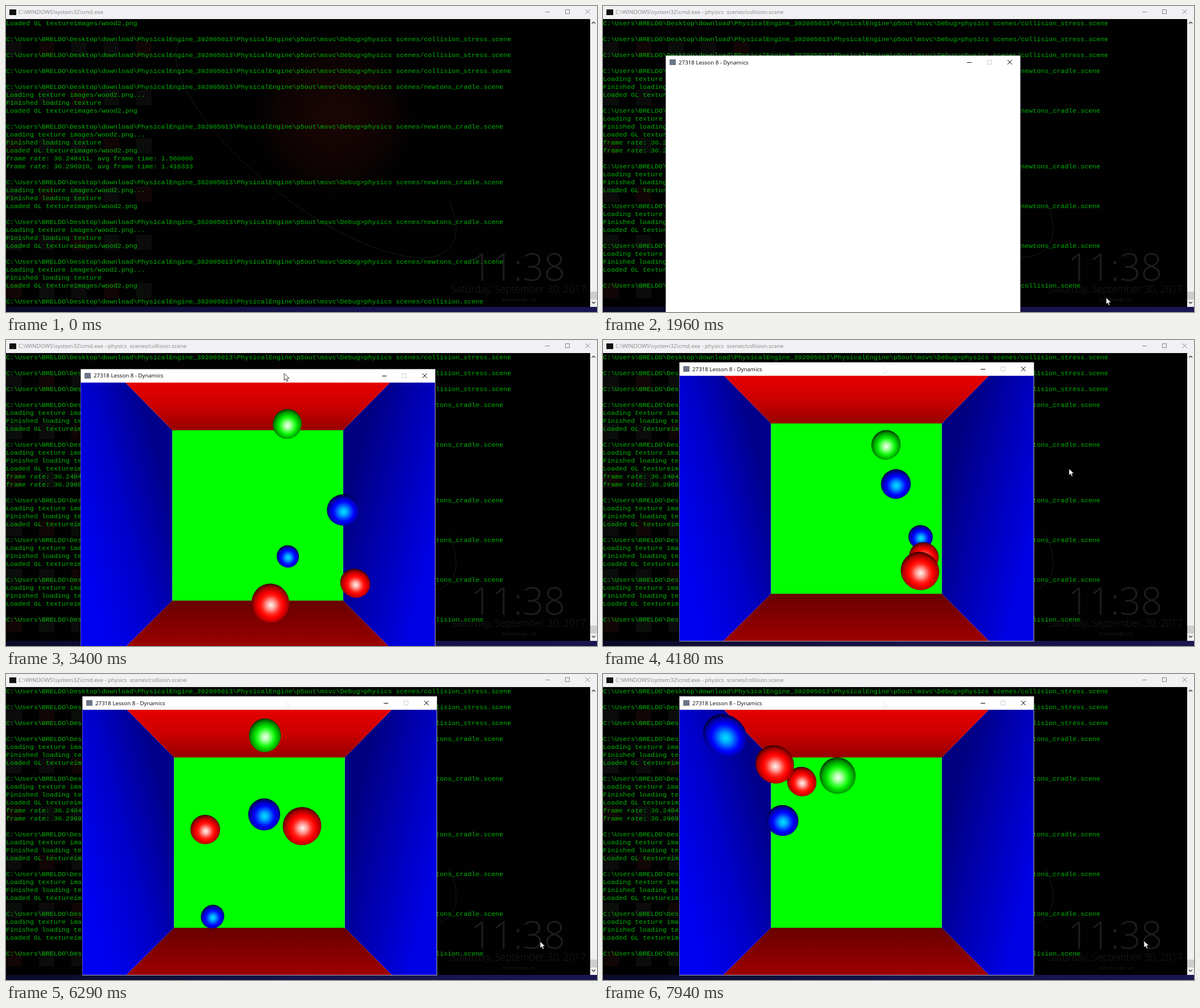
Recreate the animation shown at these times as an HTML page with a canvas. Size 1039 px wide and 539 px high, loop 8000 ms.

```html
<!DOCTYPE html>
<html lang="en">
<head>
<meta charset="utf-8">
<title>Collision demo</title>
<style>
html, body { margin: 0; width: 100%; height: 100%; overflow: hidden; background: #000; }
canvas { display: block; }
</style>
</head>
<body>
<canvas id="stage" width="1039" height="539"></canvas>
<script>
const ctx = document.getElementById('stage').getContext('2d');
const LOOP = 8000;
const ENTER = 1180, OPEN = 1960, FIRST_DRAW = 2400, GRAB = 2860, RELEASE = 3505;
const UI_FONT = '9.75px "Open Sans", sans-serif';

// Terminal text
const prompt = 'C:\\Users\\BRELDO\\Desktop\\download\\PhysicalEngine_392005013\\PhysicalEngine\\p5out\\msvc\\Debug>physics scenes/';
const loaded = 'Loaded GL textureimages/wood2.png';
const stress = [prompt + 'collision_stress.scene', ''];
const cradle = [prompt + 'newtons_cradle.scene', 'Loading texture images/wood2.png...', 'Finished loading texture', loaded];
const lines = [
  loaded, '', ...stress, ...stress, ...stress,
  ...cradle, '', ...cradle,
  'frame rate: 30.240411, avg frame time: 1.560000',
  'frame rate: 30.296910, avg frame time: 1.418333', '',
  ...cradle, '', ...cradle, '', ...cradle, '',
  prompt + 'collision.scene'
];

// Keyed paths: [time, x, y]
const mousePath = [
  [100, 1039, 539], [630, 885, 514], [1960, 885, 514], [2740, 468, 95], [2860, 468, 95],
  [3400, 489, 59], [3570, 492, 47], [3740, 492, 47], [4180, 819, 226], [4510, 874, 405],
  [4870, 871, 380], [5630, 871, 381], [6290, 939, 471], [6610, 939, 471], [7400, 951, 470]
];
const windowPath = [[2860, 110, 87], [3400, 131, 51], [3570, 134, 39]];

function along(path, t) {
  const i = path.findIndex(k => k[0] > t);
  if (i < 0) return path[path.length - 1].slice(1);
  if (i === 0) return path[0].slice(1);
  const [a, b] = [path[i - 1], path[i]];
  const f = (t - a[0]) / (b[0] - a[0]);
  return [a[1] + (b[1] - a[1]) * f, a[2] + (b[2] - a[2]) * f];
}

// Balls: place and speed in ball radii; the third value is depth as 1 / screen radius
const WALL = 6.9, BACK = 0.0508, HIT = 0.78, FOCUS = 564;
const RED = ['#fff5f0', '#ffa09a', '#ff2a20', '#f00', '#a00', '#200'];
const GREEN = ['#f0fff0', '#a8ffa0', '#30ff28', '#00e400', '#009000', '#002000'];
const BLUE = ['#00e4ff', '#00a8ff', '#0040ff', '#00f', '#0000a8', '#000018'];
const balls = [
  { tint: BLUE, at: [2.69, 3.67, 0.0508], v: [3.88, -1.95, -0.0055] },
  { tint: RED, at: [6.6, 4.6, 0.0385], v: [3.9, -1.97, 0] },
  { tint: RED, at: [0.66, 4.57, 0.0296], v: [3.92, -1.95, 0] },
  { tint: GREEN, at: [2, -6.2, 0.0385], v: [0, -4.85, 0], after: [-0.83, 1.72, -0.00197] },
  { tint: BLUE, at: [5.36, -0.34, 0.0357], v: [-4, -1.95, 0.0038], after: [-3.1, 4.67, 0.0073] }
];

function bounce(p) {
  const m = (((p + WALL) % (4 * WALL)) + 4 * WALL) % (4 * WALL);
  return m < 2 * WALL ? m - WALL : 3 * WALL - m;
}

function place({ tint, at, v, after = v }, s) {
  const [x, y, q] = at.map((p, i) => p + v[i] * Math.min(s, HIT) + after[i] * Math.max(0, s - HIT));
  const r = 1 / Math.min(q, 2 * BACK - q);
  return { tint, r, x: bounce(x) * r, y: bounce(y) * r };
}

// Drawing helpers
function rect(x, y, w, h, fill) {
  ctx.fillStyle = fill;
  ctx.fillRect(x, y, w, h);
}

function text(str, x, y, font, fill, align = 'left') {
  ctx.font = font;
  ctx.fillStyle = fill;
  ctx.textAlign = align;
  ctx.fillText(str, x, y);
}

function poly(points, fill) {
  ctx.beginPath();
  points.forEach(([x, y]) => ctx.lineTo(x, y));
  ctx.closePath();
  ctx.fillStyle = fill;
  ctx.fill();
}

function line(points, color, width = 1) {
  ctx.beginPath();
  points.forEach(([x, y], i) => i % 2 ? ctx.lineTo(x, y) : ctx.moveTo(x, y));
  ctx.strokeStyle = color;
  ctx.lineWidth = width;
  ctx.stroke();
}

function fade(x0, y0, x1, y1, ...colors) {
  const g = ctx.createLinearGradient(x0, y0, x1, y1);
  colors.forEach((c, i) => g.addColorStop(i / (colors.length - 1), c));
  return g;
}

function buttons(x, y, gap, color, middle) {
  line([[x - 4, y + 0.5], [x + 4, y + 0.5]], color);
  ctx.strokeStyle = middle;
  ctx.strokeRect(x + gap - 3.5, y - 3.5, 7, 7);
  const c = x + 2 * gap + 0.5;
  line([[c - 4, y - 4], [c + 4, y + 4], [c - 4, y + 4], [c + 4, y - 4]], color);
}

function arrow(x, y) {
  ctx.save();
  ctx.translate(x, y);
  poly([[0, 0], [0, 12], [2.8, 9.5], [4.8, 14], [6.8, 13], [4.9, 8.8], [8.8, 8.6]], '#fff');
  ctx.strokeStyle = '#000';
  ctx.lineWidth = 0.8;
  ctx.stroke();
  ctx.restore();
}

// The desktop shining faintly through the terminal
function drawBackdrop() {
  rect(0, 0, 1039, 539, '#010102');
  const glow = ctx.createRadialGradient(575, 195, 10, 575, 195, 160);
  glow.addColorStop(0, '#1a0505');
  glow.addColorStop(0.6, '#0d0303');
  glow.addColorStop(1, 'rgba(0,0,0,0)');
  rect(400, 30, 350, 340, glow);
  ctx.beginPath();
  ctx.ellipse(545, 240, 300, 110, 0.66, -0.6, Math.PI);
  ctx.strokeStyle = '#1b1b1d';
  ctx.lineWidth = 1;
  ctx.stroke();
  const shades = ['#0b0b0c', '#110505', '#0a0d0a'];
  for (let i = 0; i < 30; i++) {
    const x = 14 + (i % 5) * 57, y = 75 + Math.floor(i / 5) * 85;
    rect(x - 13, y - 12, 27, 27, shades[i * 7 % 3]);
  }
  text('11:38', 900, 484, '300 66px "Open Sans", sans-serif', '#1d1d1e', 'center');
  text('Saturday, September 30, 2017', 901, 505, '300 17.5px "Open Sans", sans-serif', '#1d1d1e', 'center');
  text('Elmsbrough, UK', 902, 520, '8px "Open Sans", sans-serif', '#1d1d1e', 'center');
}

function drawTerminal(t) {
  const running = t >= ENTER, skip = running ? 2 : 0;
  drawBackdrop();
  lines.slice(skip).forEach((str, i) =>
    text(str, 0, 34 + 14 * i, '11.665px "Liberation Mono", monospace', '#00b400'));

  rect(0, 0, 1039, 23, '#f1f0f2');
  rect(6, 6, 12, 10, '#111');
  text('C:\\WINDOWS\\system32\\cmd.exe' + (running ? ' - physics  scenes/collision.scene' : ''),
    22, 14, UI_FONT, '#858587');
  buttons(952, 10, 35, '#858587', '#858587');

  rect(1027, 23, 12, 507, '#f0f0f0');
  rect(1027, 503, 12, 14, '#cdcdcd');
  line([[1030, 31], [1033, 28], [1033, 28], [1036, 31]], '#444', 1.5);
  line([[1030, 521], [1033, 524], [1033, 524], [1036, 521]], '#444', 1.5);
  rect(0, 530, 1039, 9, fade(0, 0, 1039, 0, '#0a0a28', '#16134a', '#1a1650'));
}

// Room in window coordinates
function drawRoom() {
  const l = 161.5, r = 461.5, t = 108, b = 408, w = 623, top = 24, end = 491;
  poly([[0, top], [79, top], [l, t], [l, b], [78, end], [0, end]],
    fade(0, 290, l, 250, '#0000f0', '#0000c8', '#00008a'));
  poly([[w, top], [544, top], [r, t], [r, b], [544, end], [w, end]],
    fade(r, 250, w, 290, '#000080', '#0000b4', '#0000e4'));
  poly([[79, top], [544, top], [r, t], [l, t]], fade(0, top, 0, t, '#e60000', '#cc0000', '#960000'));
  poly([[78, end], [544, end], [r, b], [l, b]], fade(0, b, 0, end, '#680000', '#9e0000'));
  rect(l, t, r - l, b - t, '#0f0');
}

function drawBall({ x, y, r, tint }) {
  const turn = Math.atan2(y, x);
  const stretch = Math.pow(1 + (x * x + y * y) / FOCUS ** 2, 0.25);
  ctx.save();
  ctx.translate(x, y);
  ctx.rotate(turn);
  ctx.scale(r * stretch, r / stretch);
  ctx.rotate(-turn);
  const g = ctx.createRadialGradient(0.03, 0.11, 0, 0.03, 0.11, 1.14);
  [0, 0.2, 0.42, 0.57, 0.8, 1].forEach((p, i) => g.addColorStop(p, tint[i]));
  ctx.beginPath();
  ctx.arc(0, 0, 1, 0, 7);
  ctx.fillStyle = g;
  ctx.fill();
  ctx.restore();
}

function drawWindow(t) {
  ctx.save();
  ctx.translate(...along(windowPath, t));
  rect(0, 0, 624, 492, '#55556a');
  rect(0.5, 0.5, 623, 491, '#fff');
  if (t >= FIRST_DRAW) {
    // The simulation stands still while the window is held.
    const s = (t < GRAB ? t - GRAB : Math.max(0, t - RELEASE)) / 1000;
    ctx.save();
    ctx.beginPath();
    ctx.rect(0.5, 24, 622.5, 467);
    ctx.clip();
    drawRoom();
    ctx.translate(311.5, 258);
    balls.map(b => place(b, s)).sort((a, b) => a.r - b.r).forEach(drawBall);
    ctx.restore();
  }
  rect(7, 7, 11, 10, '#6d7688');
  text('27318 Lesson 8 - Dynamics', 23, 15.5, UI_FONT, '#000');
  buttons(534, 12, 35.3, '#000', '#ccc');
  if (t >= 3740) {
    ctx.globalAlpha = 0.1;
    arrow(358, 8);
  }
  ctx.restore();
}

function draw(now) {
  const t = now % LOOP;
  drawTerminal(t);
  if (t >= OPEN) drawWindow(t);
  if (t >= 100) arrow(...along(mousePath, t));
  requestAnimationFrame(draw);
}
requestAnimationFrame(draw);
</script>
</body>
</html>
```
